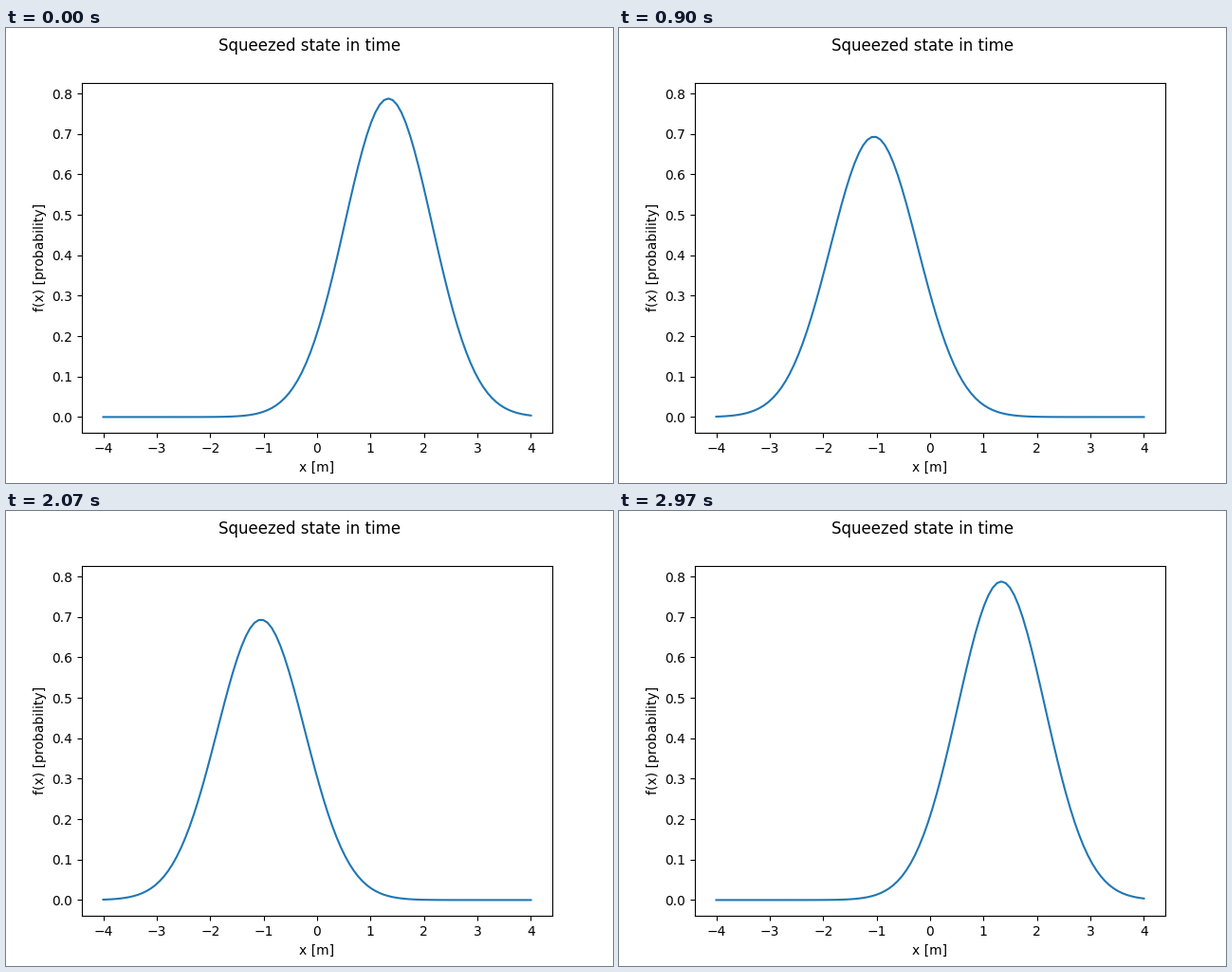
A matplotlib script that plays this animation: 640 by 480 pixels, repeating every 3 s.

```python
import numpy as np
import matplotlib.pyplot as plt
from matplotlib.animation import FuncAnimation

FRAMES = 100
INTERVAL = 30  # ms

x = np.linspace(-4, 4, 100)
times = np.linspace(0, 4 * np.pi, FRAMES)


def density(t):
    """Wave packet whose centre swings as cos(t)."""
    return np.exp(x**2 / 4 - (x - np.cos(t))**2) / np.sqrt(np.pi)


fig, ax = plt.subplots(figsize=(6.4, 4.8), dpi=100)
fig.suptitle("Squeezed state in time")
ax.set_xlabel("x [m]")
ax.set_ylabel("f(x) [probability]")

# Axis limits follow from the first, tallest curve.
line, = ax.plot(x, density(0))


def update(i):
    line.set_ydata(density(times[i]))
    return line,


anim = FuncAnimation(fig, update, frames=FRAMES, interval=INTERVAL,
                     repeat=True, repeat_delay=0)
plt.show()
```
